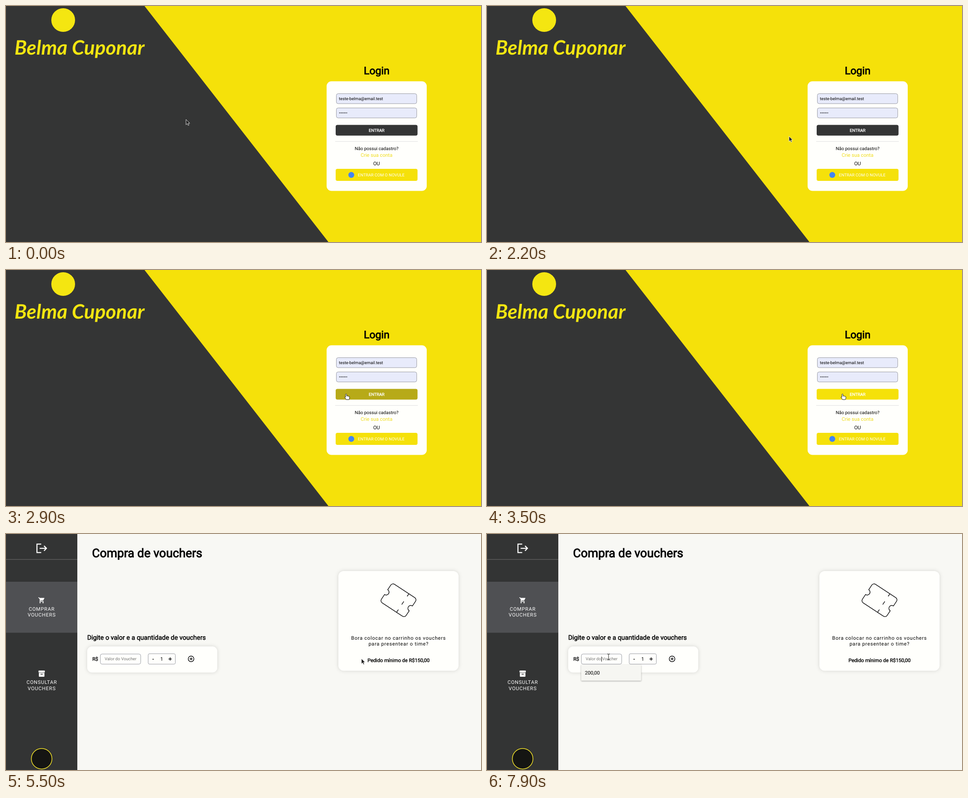
Write an HTML page that moves like this. It is 1059 px wide and 529 px high and loops after 8000 ms.

```html
<!DOCTYPE html>
<html lang="pt-BR">
<head>
<meta charset="utf-8">
<title>Compra de vouchers</title>
<style>
html, body { margin: 0; width: 100%; height: 100%; overflow: hidden; background: #343535; }
svg { display: block; width: 1059px; height: 529px; }
text { font-family: Roboto, sans-serif; font-size: 11.1px; text-rendering: geometricPrecision; white-space: pre; }
.mid { text-anchor: middle; }
.wide { letter-spacing: .77px; }
.small { font-size: 9.3px; }
.bold { stroke: currentColor; stroke-width: .4px; }
.white { fill: #fff; color: #fff; }
.card { fill: #fffffc; }
.soft { filter: drop-shadow(0 0 4px rgba(0, 0, 0, .14)); }
.field { stroke: #8e9099; stroke-width: .9; }
.line { fill: none; stroke: #111; }
</style>
</head>
<body>
<svg viewBox="0 0 1059 529" xmlns="http://www.w3.org/2000/svg">
  <g id="login">
    <rect width="1059" height="529" fill="#f5e10a"/>
    <path d="M0 0H308.8L718.8 529H0z" fill="#343535"/>
    <circle cx="127.5" cy="31.5" r="26.5" fill="#f4e611"/>
    <text x="19" y="109" fill="#f4e611" style="font:italic 700 44.6px Lato,sans-serif">Belma Cuponar</text>

    <text class="mid bold" x="826.4" y="152.9" style="font-size:23.3px;stroke-width:.95px">Login</text>
    <rect class="card" x="714.8" y="168.8" width="223.2" height="245.7" rx="11"/>
    <g class="field" fill="#e8ebfb">
      <rect x="736.5" y="196.5" width="179.2" height="22.4" rx="4"/>
      <rect x="736.5" y="228.5" width="179.2" height="22.4" rx="4"/>
    </g>
    <text class="small" x="742.3" y="211">teste-belma@email.test</text>
    <text class="small" x="742.3" y="243.2">••••••</text>
    <rect id="enter" x="735" y="266.5" width="182.5" height="24" rx="4"/>
    <text class="mid small bold white" x="826.3" y="282">ENTRAR</text>
    <path d="M734 303.7H918" stroke="#dfdfdf"/>
    <text class="mid" x="826.3" y="322.5" style="font-size:10.1px">Não possui cadastro?</text>
    <text class="mid" x="826.1" y="337.7" fill="#f0dc1a">Crie sua conta</text>
    <text class="mid" x="826.1" y="356.6">OU</text>
    <rect x="735" y="365" width="182.5" height="27" rx="4" fill="#f5e10a"/>
    <circle cx="769.8" cy="378.6" r="6.6" fill="#4285f4"/>
    <text class="small white" x="784.6" y="382">ENTRAR COM O NOVULE</text>
  </g>

  <g id="shop">
    <rect width="1059" height="529" fill="#f8f8f4"/>
    <rect width="159" height="529" fill="#333434"/>
    <path d="M0 57H159" stroke="#707070"/>
    <rect id="active" y="107" width="159" height="114.3" fill="#4f5053"/>
    <path d="M78.5 22.6H69V41.6H78.5M75 32.1H90M84.8 26.6 90.2 32.1 84.8 37.6" fill="none" stroke="#fff" stroke-width="2.3"/>
    <g class="white" transform="translate(71.3 140.6) scale(.667)">
      <path d="M1 2v2h2l3.6 7.6-1.4 2.4c-.7 1.3.3 3 1.8 3h12v-2H7.4l1.1-2h7.4c.8 0 1.4-.4 1.8-1l3.6-6.5q.6-1.4-.9-1.5H5.2l-.9-2z"/>
      <circle cx="7" cy="20" r="2"/><circle cx="17" cy="20" r="2"/>
    </g>
    <g class="white">
      <rect x="72.5" y="306" width="14" height="4.4" rx="1"/>
      <path d="M73.3 311.3H85.7V318.7Q85.7 320 84.4 320H74.6Q73.3 320 73.3 318.7z"/>
    </g>
    <path d="M77 314.3H82" stroke="#333434" stroke-width="1.5"/>
    <g class="mid wide white">
      <text x="79.6" y="171.8">COMPRAR</text>
      <text x="79.6" y="185.2">VOUCHERS</text>
      <text x="79.8" y="336.4">CONSULTAR</text>
      <text x="79.6" y="349.8">VOUCHERS</text>
    </g>
    <circle cx="79.5" cy="503.8" r="23" fill="#151513" stroke="#f0e02a" stroke-width="1.5"/>

    <g id="order">
      <text class="bold" x="191.8" y="51.8" style="font-size:26.8px;stroke-width:.95px">Compra de vouchers</text>
      <text class="bold" x="180.9" y="237" style="font-size:14.5px;stroke-width:.5px">Digite o valor e a quantidade de vouchers</text>
      <rect class="card soft" x="181" y="252" width="290" height="58.5" rx="11"/>
      <text class="bold" x="192.4" y="284">R$</text>
      <g class="field" fill="#fffffc">
        <rect x="210.3" y="269" width="90" height="22.7" rx="4"/>
        <rect x="317" y="268.4" width="60.5" height="23.3" rx="3"/>
      </g>
      <text class="mid small" x="255.5" y="283.4" fill="#757575">Valor do Voucher</text>
      <text class="mid bold" x="328" y="284">-</text>
      <text class="mid" x="347" y="284">1</text>
      <path class="line" d="M362.3 280.2H369.5M365.9 276.6V283.8" stroke-width="1.6"/>
      <circle class="line" cx="412.6" cy="279.9" r="6.3" stroke-width="1.5"/>
      <path class="line" d="M409.2 279.9H416M412.6 276.5V283.3" stroke-width="1.5"/>

      <rect class="card soft" x="741" y="83" width="268" height="223.5" rx="12"/>
      <g transform="translate(875 148.5) rotate(33.5)">
        <path id="ticket" class="line" stroke-width="1.5"/>
        <path class="line" d="M11.4-25V-18M11.4-4.3V4M11.4 17.5V25" stroke-width="1.5"/>
      </g>
      <text class="mid wide" x="875.2" y="236.6">Bora colocar no carrinho os vouchers</text>
      <text class="mid wide" x="875.2" y="250">para presentear o time?</text>
      <text class="mid bold" x="875.3" y="287.3">Pedido mínimo de R$150,00</text>
    </g>
    <path id="caret" d="M255.5 275V286" stroke="#111"/>
    <g id="list">
      <rect x="210" y="293" width="133.7" height="35.7" rx="1" fill="#f6f6f2" style="filter:drop-shadow(0 1px 1.5px rgba(0,0,0,.35))"/>
      <text x="218.2" y="314.7" fill="#222" color="#222" class="bold" style="stroke-width:.2px">200,00</text>
    </g>
  </g>

  <g id="pointer">
    <path id="arrow" d="M.3.3V12.2L3.1 9.6 5 13.7 7 12.8 5.1 8.8H8.8z" fill="#222" stroke="#fff" stroke-width=".8"/>
    <path id="hand" d="M-1.3 1Q0-.8 1.3 1V5Q2.6 4 3.5 5.2 4.8 4.4 5.6 5.7 7.5 5.3 7.6 7.2V9.5Q7.4 11 6.4 13H.2Q-1 10.5-3.3 8 -3.2 6.2-1.3 7.6z" fill="#fff" stroke="#222"/>
    <path id="beam" d="M-3-6.5H-1L0-5.7 1-6.5H3M0-5.7V5.7M-3 6.5H-1L0 5.7 1 6.5H3" fill="none" stroke="#222"/>
  </g>
</svg>
<script>
const LOOP = 8000, STEP = 100;
const $ = id => document.getElementById(id);
const show = (id, on) => $(id).setAttribute('display', on ? 'inline' : 'none');

// time, x, y of the pointer's hot spot
const path = [
  [700, 401, 254], [900, 504, 324], [1300, 504, 324], [1400, 566, 311],
  [1600, 639, 301], [2000, 639, 301], [2300, 690, 287], [2600, 738, 279],
  [2700, 742, 277.6], [3300, 791, 277.6], [3400, 791, 277.6], [3500, 792.5, 277.6],
  [5200, 792.5, 277.6], [5300, 792, 279], [6400, 792, 279], [6500, 735, 270],
  [6600, 590, 258], [6700, 430, 262], [6800, 357, 275], [7000, 357, 275],
  [7400, 271, 275.5]
];

const mix = (a, b, k) => a + (b - a) * k;

function place(t) {
  const i = path.findIndex(p => p[0] >= t);
  if (i === 0) return path[0].slice(1);
  if (i < 0) return path[path.length - 1].slice(1);
  const [t0, x0, y0] = path[i - 1], [t1, x1, y1] = path[i];
  const k = (t - t0) / (t1 - t0);
  return [mix(x0, x1, k), mix(y0, y1, k)];
}

// cubic-bezier(.25, .1, .25, 1)
function ease(x) {
  if (x <= 0 || x >= 1) return x <= 0 ? 0 : 1;
  const curve = (a, b, s) => 3 * (1 - s) ** 2 * s * a + 3 * (1 - s) * s * s * b + s ** 3;
  let lo = 0, hi = 1;
  for (let i = 0; i < 24; i++) {
    const s = (lo + hi) / 2;
    if (curve(.25, .25, s) < x) lo = s; else hi = s;
  }
  return curve(.1, 1, lo);
}

function ticket(w, h, r, n) {
  const corner = (x, y) => `a${r} ${r} 0 0 1 ${x * r} ${y * r}`;
  const notch = y => `a${n} ${n} 0 0 0 0 ${y * 2 * n}`;
  return `M${r - w} ${-h}H${w - r}${corner(1, 1)}V${-n}${notch(1)}V${h - r}${corner(-1, 1)}` +
    `H${r - w}${corner(-1, -1)}V${n}${notch(-1)}V${r - h}${corner(1, -1)}z`;
}

function draw(time) {
  const t = Math.floor((time % LOOP) / STEP) * STEP;
  const inShop = t >= 5300, loaded = t >= 5500;
  show('login', !inShop);
  show('shop', inShop);
  show('active', loaded);
  show('order', loaded);
  show('caret', t >= 7600);
  show('list', t >= 7900);

  const k = ease((t - 2622) / 700);
  const rgb = [mix(52, 245, k), mix(53, 225, k), mix(53, 10, k)].map(Math.round);
  $('enter').setAttribute('fill', `rgb(${rgb})`);

  const [x, y] = place(t);
  const hand = t >= 2600 && !inShop, beam = t >= 7300;
  show('hand', hand);
  show('beam', beam);
  show('arrow', !hand && !beam);
  $('pointer').setAttribute('transform', `translate(${x} ${y})`);
}

$('ticket').setAttribute('d', ticket(33, 25, 6, 6.5));
const start = performance.now();
function tick() {
  draw(performance.now() - start);
  requestAnimationFrame(tick);
}
tick();
</script>
</body>
</html>
```
